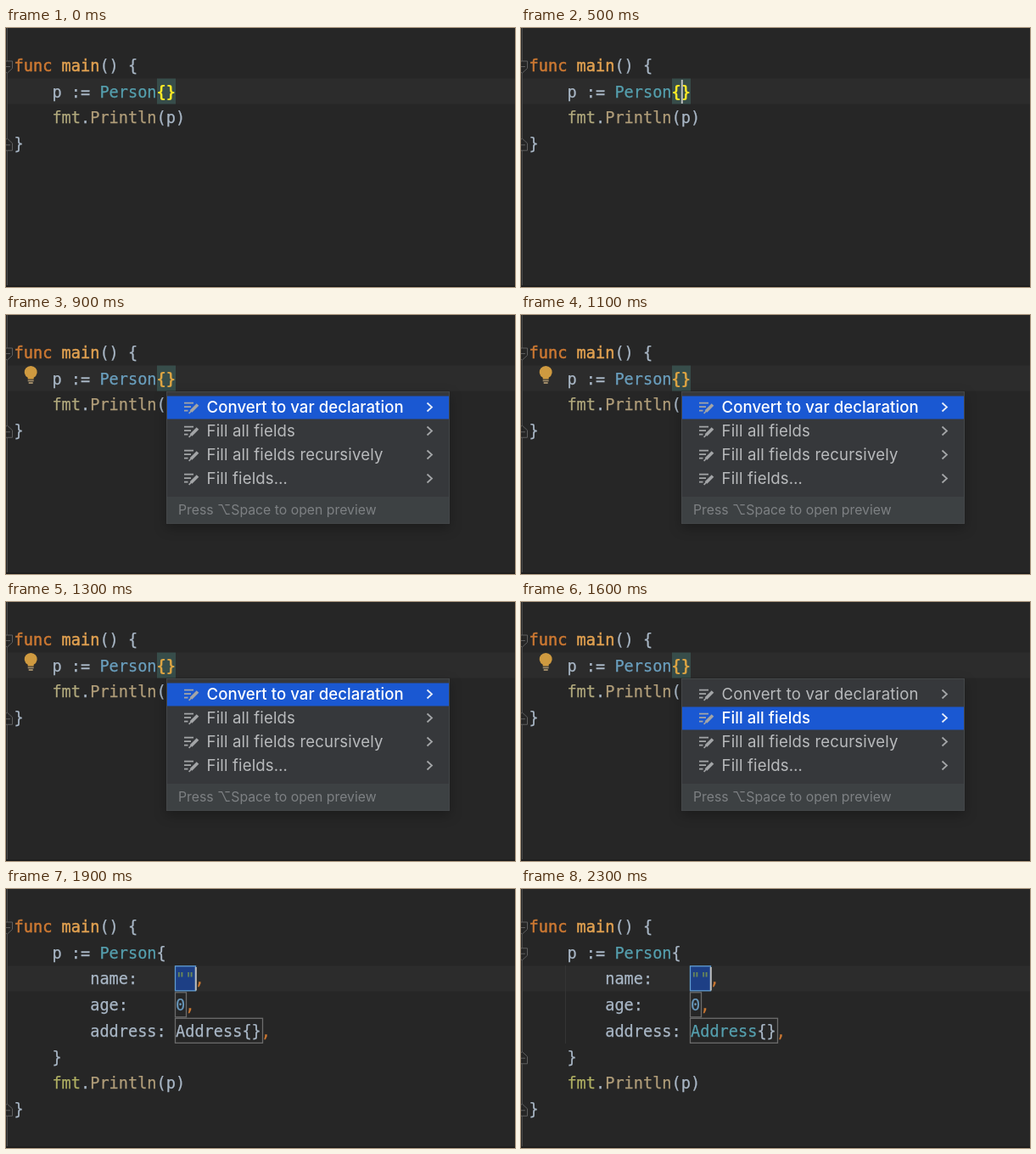
An HTML page for the animation above (2400 ms loop, 600x305 px).

```html
<!DOCTYPE html>
<html lang="en">
<head>
<meta charset="utf-8">
<title>Fill all fields</title>
<style>
html, body { margin: 0; width: 100%; height: 100%; overflow: hidden; background: #262626; }
svg { display: block; width: 600px; height: 305px; }
text { white-space: pre; }
.code { font: 18.6px "DejaVu Sans Mono", monospace; fill: #a9b7c6; stroke: #a9b7c6; stroke-width: .25px; }
.ui { font: 18.6px Inter, sans-serif; letter-spacing: .15px; fill: #b8babc; }
.hint { font: 15.8px Inter, "DejaVu Sans", sans-serif; fill: #7d8083; }
.kw { fill: #cc7832; stroke: #cc7832; stroke-width: .5px; }
.fn { fill: #e0a050; stroke: #e0a050; stroke-width: .5px; }
.type { fill: var(--type); stroke: var(--type); }
.late { fill: var(--late); stroke: var(--late); }
.pkg { fill: var(--pkg); stroke: var(--pkg); }
.call { fill: #b09d79; stroke: #b09d79; }
.comma { fill: #cc7832; stroke: #cc7832; }
.str { fill: #6a8759; stroke: #6a8759; }
.num { fill: #6897bb; stroke: #6897bb; }
.brace { fill: var(--brace); stroke: none; font-weight: bold; }
.fold { fill: #262626; stroke: #5e5e5e; }
.icon { fill: none; stroke: #a3a5a7; stroke-width: 1.8; }
.on .ui { fill: #fff; font-weight: 500; letter-spacing: .05px; }
.on .arrow { stroke: #e6ecf8; }
.shadow { filter: drop-shadow(0 5px 7px rgba(0, 0, 0, .28)); }
</style>
</head>
<body>
<svg id="stage" viewBox="0 0 600 305"></svg>
<script>
const LOOP = 2400, LEFT = 9.6, CELL = 11.2, PITCH = 30.75;
const MENU_AT = 600, NEXT_AT = 1600, FILL_AT = 1900, DONE_AT = 2200;

const rect = (x, y, w, h, fill, more = '') =>
  `<rect x="${x}" y="${y}" width="${w}" height="${h}" fill="${fill}" ${more}/>`;
const group = (id, body) => `<g id="${id}">${body}</g>`;

// Each token is [column, text, class].
const line = (row, ...tokens) => tokens.map(([col, s, cls = '']) =>
  `<text class="code ${cls}" x="${LEFT + col * CELL}" y="${50.8 + row * PITCH}">${s}</text>`).join('');

// Half of a folding tag; dir 1 points down, -1 points up.
const fold = (row, dir) =>
  `<g class="fold" transform="translate(0 ${45.5 + row * PITCH}) scale(1 ${dir})">` +
  '<path d="M-1 -6.5H7.5V2L1.5 7.5L-1 6M0 0H5"/></g>';

const printLine = row => line(row, [4, 'fmt', 'pkg'], [7, '.'], [8, 'Println', 'call'], [15, '(p)']);
const declare = line(1, [4, 'p'], [6, ':='], [9, 'Person', 'type']);

const before = rect(2, 59.5, 598, 30, '#2c2c2c') + rect(178, 59.5, 22, 30, '#374d4a') +
  declare + line(1, [15, '{}', 'brace']) + printLine(2) + line(3, [0, '}']);

const box = (x, y, w, fill, stroke) => rect(x, y, w, 29, fill, `stroke="${stroke}" stroke-width="1.3"`);

const after = rect(2, 90.5, 598, 30, '#2c2c2c') +
  box(199.5, 90.8, 24, '#1d3f85', '#5f9bd0') +
  box(199.5, 121.8, 13, 'none', '#6c6c6c') +
  box(199.5, 152.3, 103, 'none', '#6c6c6c') +
  declare + line(1, [15, '{']) +
  line(2, [8, 'name:'], [17, '""', 'str'], [19, ',', 'comma']) +
  line(3, [8, 'age:'], [17, '0', 'num'], [18, ',', 'comma']) +
  line(4, [8, 'address:'], [17, 'Address', 'late'], [24, '{}'], [26, ',', 'comma']) +
  line(5, [4, '}']) + printLine(6) + line(7, [0, '}']) +
  rect(222.8, 92, 2, 27.5, '#bcbcbc');

const folds = fold(1, 1) + fold(5, -1) + rect(52, 90, 1, 92, '#343434');

const bulb = '<path fill="#cf9a40" d="M25.7 75.5V73.8A7.4 7.4 0 1 1 32.7 73.8V75.5Z"/>' +
  '<path stroke="#a08b68" stroke-width="1.8" d="M25.7 77.3H32.7M26.7 80H31.7"/>';

const item = (label, i) => {
  const y = 109 + i * 28;
  return '<g class="item">' +
    rect(189.5, y - 13.5, 333, 27, '#1a58d2', 'class="bar"') +
    `<g class="icon" transform="translate(210 ${y})">` +
    '<path d="M0 -5.3H11M0 -.8H8M0 3.7H4.5"/><path stroke-width="3.8" d="M8 4.5L16 -3.5"/>' +
    '<path stroke-width="1.6" d="M5.6 6.9L8.5 4"/></g>' +
    `<path class="icon arrow" d="M496.5 ${y - 5.5}L502 ${y - .5}L496.5 ${y + 4.5}"/>` +
    `<text class="ui" x="236.5" y="${y + 6}">${label}</text></g>`;
};
const labels = ['Convert to var declaration', 'Fill all fields', 'Fill all fields recursively', 'Fill fields…'];
const menu = bulb + rect(189, 90, 334, 156, '#36383b', 'class="shadow"') +
  rect(189, 214, 334, 32, '#3d4143') + labels.map(item).join('') +
  rect(189.5, 90.5, 333, 155, 'none', 'stroke="#434648"') +
  '<text class="hint" x="203" y="235.3">Press ⌥Space to open preview</text>';

const stage = document.getElementById('stage');
stage.innerHTML = rect(0, 0, 600, 305, '#262626') + rect(0, 303.5, 600, 1.5, '#1b1b1b') +
  group('before', before) + group('caret', rect(188.8, 61, 2, 28, '#bcbcbc')) +
  group('after', after) + rect(1, 0, 1, 303, '#4b4b4b') + group('folds', folds) +
  line(0, [0, 'func', 'kw'], [5, 'main', 'fn'], [9, '()'], [12, '{']) + fold(0, 1) +
  // Tags of the closing braces sit above the gutter line.
  group('endBefore', fold(3, -1)) + group('endAfter', fold(7, -1)) + group('menu', menu);

const show = (id, on) => { document.getElementById(id).style.display = on ? '' : 'none'; };
const tint = (name, value) => stage.style.setProperty('--' + name, value);
const items = [...stage.querySelectorAll('.item')];

function draw(t) {
  const open = t >= MENU_AT && t < FILL_AT, filled = t >= FILL_AT, done = t >= DONE_AT;
  show('before', !filled);
  show('endBefore', !filled);
  show('caret', t >= 500 && t < MENU_AT);
  show('after', filled);
  show('endAfter', filled);
  show('folds', done);
  show('menu', open);
  const picked = t < NEXT_AT ? 0 : 1;
  items.forEach((el, i) => {
    el.classList.toggle('on', i === picked);
    el.querySelector('.bar').style.display = i === picked ? '' : 'none';
  });
  tint('type', open ? '#6a9fbe' : '#559fae');
  tint('late', done ? '#559fae' : '#a9b7c6');
  tint('brace', open ? '#dca443' : '#ffe926');
  tint('pkg', filled ? '#aeae62' : '#b0a87c');
}

function tick() {
  draw(performance.now() % LOOP);
  requestAnimationFrame(tick);
}
tick();
</script>
</body>
</html>
```
